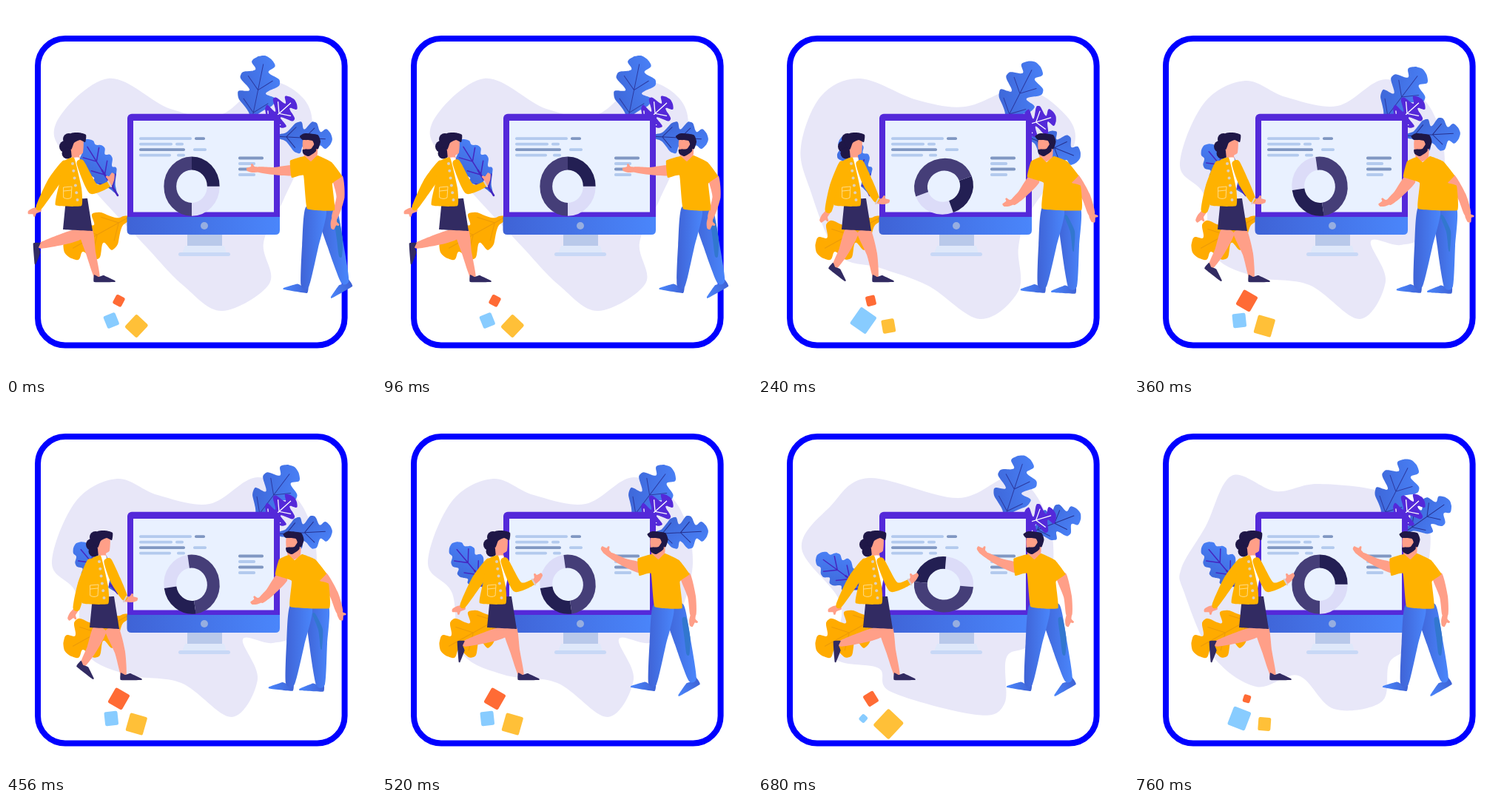
Write an HTML page that moves like this. It is 500 by 500 pixels and loops after 800 ms.

```html
<!DOCTYPE html>
<html lang="en">
<head>
<meta charset="utf-8">
<title>Dashboard team</title>
<style>
html, body { margin: 0; width: 100%; height: 100%; overflow: hidden; background: #fff; }
svg { display: block; width: 100vw; height: 100vh; }
</style>
</head>
<body>
<svg id="stage" viewBox="0 0 500 500">
  <defs>
    <linearGradient id="blue"><stop stop-color="#3f63d6"/><stop offset="1" stop-color="#4a86fb"/></linearGradient>
    <linearGradient id="leafBlue" x1="0" y1="1" x2="1" y2="0"><stop stop-color="#3b60d0"/><stop offset="1" stop-color="#4b85fc"/></linearGradient>
  </defs>
</svg>
<script>
const LOOP = 800;
const SCENE_STARTS = [0, 160, 360, 560, 760];
const POSE_STARTS = [0, 240, 520];
const SKIN = '#ff9f88', YELLOW = '#ffb200', HAIR = '#1f1747', SKIRT = '#322b62';
const BLUE = 'url(#blue)', LEAF_BLUE = 'url(#leafBlue)', PURPLE = '#5429d9', TEAL = '#3277cf';
const stage = document.getElementById('stage');

function set(node, attrs) {
  for (const key in attrs) node.setAttribute(key, attrs[key]);
  return node;
}
const el = (parent, tag, attrs = {}) =>
  parent.appendChild(set(document.createElementNS('http://www.w3.org/2000/svg', tag), attrs));
const group = (parent, x = 0, y = 0) => el(parent, 'g', { transform: `translate(${x} ${y})` });
const points = text => text.split(' ').map(p => p.split(',').map(Number));
const rect = (parent, x, y, width, height, fill, rx = 0) =>
  el(parent, 'rect', { x, y, width, height, fill, rx });
const line = (parent, d, stroke, width) =>
  el(parent, 'path', { d, stroke, fill: 'none', 'stroke-width': width, 'stroke-linecap': 'round' });

// Closed spline through the points; k sets the roundness.
function smooth(pts, k = 1) {
  const n = pts.length, at = i => pts[(i + n) % n], s = k / 6;
  let d = 'M' + pts[0];
  for (let i = 0; i < n; i++) {
    const [a, b, c, e] = [at(i - 1), at(i), at(i + 1), at(i + 2)];
    d += `C${b[0] + (c[0] - a[0]) * s} ${b[1] + (c[1] - a[1]) * s} `
       + `${c[0] - (e[0] - b[0]) * s} ${c[1] - (e[1] - b[1]) * s} ${c}`;
  }
  return d + 'Z';
}
const shape = (parent, text, fill, k = 0.6) => el(parent, 'path', { d: smooth(points(text), k), fill });

// Tapered limb through joints given as x,y,radius
function limb(parent, text, fill) {
  const joints = points(text), left = [], right = [];
  joints.forEach(([x, y, r], i) => {
    const a = joints[Math.max(i - 1, 0)], b = joints[Math.min(i + 1, joints.length - 1)];
    const angle = Math.atan2(b[1] - a[1], b[0] - a[0]);
    const dx = -Math.sin(angle) * r, dy = Math.cos(angle) * r;
    left.push([x + dx, y + dy]);
    right.unshift([x - dx, y - dy]);
  });
  return el(parent, 'path', { d: smooth([...left, ...right], 0.7), fill });
}
function hand(parent, x, y, turn, flip = 1) {
  shape(parent, '-2,-3 5,-4 8,-8 10,-7 10,-4 16,-2 15,2 8,4 -2,3', SKIN)
    .setAttribute('transform', `translate(${x} ${y}) rotate(${turn}) scale(1 ${flip})`);
}
function shoe(parent, x, y, turn, fill = SKIRT, sx = 1, sy = 1) {
  shape(parent, '-4,-1 2,2 9,0 24,7 24,9 -4,9', fill, 0.3)
    .setAttribute('transform', `translate(${x} ${y}) rotate(${turn}) scale(${sx} ${sy})`);
}

el(stage, 'rect', { x: 43, y: 44, width: 414.6, height: 414.5, rx: 37, fill: '#fff', stroke: '#00f', 'stroke-width': 8 });

// Background blob, one outline per scene
const blobs = [
  '138,98 222,139 290,147 350,102 402,125 412,175 375,262 348,320 356,375 292,412 240,378 190,326 92,217 67,160',
  '138,98 215,127 280,136 350,112 402,134 428,185 368,278 352,326 352,385 300,423 230,378 165,354 108,335 70,247 58,190 85,122',
  '150,101 205,123 275,135 340,99 398,134 420,215 393,305 360,323 320,318 340,372 305,423 237,377 165,366 107,335 95,256 62,215 94,132',
  '150,100 270,127 345,98 390,150 398,225 370,320 336,342 333,405 295,420 180,389 163,357 103,342 112,270 59,195 98,138',
  '132,97 192,118 250,108 345,122 400,172 375,315 345,350 335,402 270,412 222,367 165,382 106,340 68,255 64,222 97,165'
].map(text => smooth(points(text)));
const blob = el(stage, 'path', { fill: '#e8e7f8' });

// Lobed leaf growing upward from its base; a cosine cuts the notches.
function leaf(x, y, len, w, lobes, notch, fill, vein, veinWidth = 1) {
  const turn = el(group(stage, x, y), 'g'), right = [], left = [], N = 40;
  for (let i = 1; i < N; i++) {
    const t = i / N, cut = notch * (0.5 - 0.5 * Math.cos(2 * Math.PI * lobes * t)) ** 2;
    const half = Math.sqrt(Math.sin(Math.PI * t)) * Math.min(1, 4 * t) * (1 - cut);
    const rise = -len * (t + 0.16 * half * (1 - t));
    right.push([half * w, rise]);
    left.unshift([-half * w, rise]);
  }
  el(turn, 'path', { d: smooth([[0, 0], ...right, [0, -len], ...left]), fill });
  let veins = `M0 0V${-0.88 * len}`;
  for (let i = 1; i < lobes - 0.5; i++) {
    const root = -len * (i / lobes - 0.1), tip = root - 0.16 * len;
    veins += `M${-0.6 * w} ${tip}L0 ${root}L${0.6 * w} ${tip}`;
  }
  line(turn, veins, vein, veinWidth);
  return turn;
}
const leaves = [
  [leaf(330, 165, 100, 28, 3.2, 0.6, LEAF_BLUE, '#2c3aa0'), [11.6, 27, 37, 18, 27]],
  [leaf(362, 176, 79, 23, 3.2, 0.5, LEAF_BLUE, '#26318f'), [93, 112, 87, 69, 55]],
  [leaf(346, 166, 59, 21, 3.2, 0.75, PURPLE, '#fff', 1.3), [48, 73, 48, 73, 48]],
  [leaf(151, 256, 88, 21, 4.2, 0.28, LEAF_BLUE, '#4527c0', 1.5), [-32, -24, -40, -54, -40]]
];
line(leaves[3][0], 'M0 0V-40', '#4527c0', 2.6);
leaf(172, 282, 106, 30, 3.2, 0.55, '#ffab00', '#ec9a08').setAttribute('transform', 'rotate(-119)');

// Monitor
rect(stage, 245, 308, 47, 18, '#b9c9ea');
shape(stage, '242,324 295,324 298,334 238,334', '#dfe8fa', 0);
rect(stage, 233, 333, 70, 5, '#c8d8f6', 2.5);
rect(stage, 164, 145.7, 206, 150, PURPLE, 6);
rect(stage, 172, 155, 190, 123.5, '#e9f1ff');
el(stage, 'path', { d: 'M163.500 285H370V303Q370 309 364 309H169.500Q163.500 309 163.500 303Z', fill: BLUE });
el(stage, 'circle', { cx: 268, cy: 297, r: 5, fill: '#97aee0' });

// Placeholder text: two bars per row on the left, one on the right
const LIGHT = '#b3caee', DARK = '#8097c2';
const bar = (x, row, top, width, dark) =>
  rect(stage, x, top + 7.5 * row, width, 3.8, dark ? DARK : LIGHT, 1.7);
[[71, 255, 14], [45, 229, 11], [62, 253, 18], [43, 231, 11]].forEach(([first, x, second], row) => {
  bar(180, row, 177.2, first, row === 2);
  bar(x, row, 177.2, second, row === 0);
  bar(314, row, 203.6, row % 2 ? 23 : 34, row % 2 === 0);
});

// Ring chart, slightly oval, turned as a whole
const ring = el(stage, 'g');
[['#dcdcf8', 0, 90], ['#231f53', -90, 90], ['#453e78', 90, 180]].forEach(([stroke, from, sweep]) =>
  el(ring, 'circle', {
    r: 30.3, fill: 'none', stroke, 'stroke-width': 17.4, pathLength: 360,
    'stroke-dasharray': `${sweep} ${360 - sweep}`, transform: `scale(.965 1.03) rotate(${from})`
  }));
const ringTurns = [0, 70, 172, 275, 360];

// Tiles: size and angle per scene
const tiles = [
  ['#ff6b35', 152.5, 398.3, [13, 13, 22, 16, 10], [28, -13, 30, -32, 17]],
  ['#88ccff', 142.3, 425, [17, 26, 18, 9.5, 25], [-22, 35, -6, 42, 21]],
  ['#ffc038', 176.3, 432.5, [22.5, 17.5, 24, 29, 17], [43, -10, 16, 43, 4]]
].map(([fill, x, y, sizes, angles]) => ({ node: el(group(stage, x, y), 'rect', { fill, rx: 2.5 }), sizes, angles }));

// Woman
function womanBody(g) {
  shape(g, '81,261 110,260 117,304 77,302', SKIRT, 0);
  for (const [cx, cy, r] of points('85,180,8 80,190,8 83,199,7.500'))
    el(g, 'circle', { cx, cy, r, fill: HAIR });
  shape(g, '87,182 104,180 104,198 99,202 100,208 90,208 88,196', SKIN);
  shape(g, '80,184 88,172 98,171 108,174 107,184 100,181 92,185 88,194', HAIR);
  shape(g, '90,206 99,205 105,232 102,249 92,247', '#fff', 0.2);
  shape(g, '92,205 77,211 72,240 67,269 102,270 102,246', YELLOW, 0.4);
  for (let i = 0; i < 6; i++)
    el(g, 'circle', { cx: 90 + 1.3 * i, cy: 213 + 9.8 * i, r: 2, fill: '#dccfc0' });
  line(g, 'M78 245L89 244L88 259Q83 262 78 259ZM78 250L88 249', '#ffe09a', 0.9);
}
function womanStride(dx, handTurn) {
  const g = group(stage, dx);
  limb(g, '104,307,6 84,313,8 46,324,3.800', SKIN);
  shoe(g, 46, 324, 86);
  limb(g, '108,304,9 115,335,6.500 123,366,3.800', SKIN);
  shoe(g, 123, 364, 0);
  hand(g, 45, 275, 165);
  limb(g, '83,213,7 63,240,8 44,273,4', YELLOW);
  womanBody(g);
  hand(g, 140, 241, handTurn);
  limb(g, '100,211,5 118,247,8 139,241,4', YELLOW);
  line(g, 'M138 237L142 244', '#d9cfd0', 2.4);
  return g;
}
function womanWalk() {
  const g = group(stage);
  limb(g, '127,304,9 116,331,7 104,352,3.800', SKIN);
  shoe(g, 104, 350, 38);
  limb(g, '143,304,9 154,335,7 159,366,3.800', SKIN);
  shoe(g, 159, 364, 0);
  hand(g, 94, 279, 128);
  limb(g, '117,213,7 103,245,6.500 95,277,4.500', YELLOW);
  womanBody(group(g, 36));
  hand(g, 162, 264, 0);
  limb(g, '137,211,5 148,238,7 161,263,4', YELLOW);
  line(g, 'M163 260L159 267', '#d9cfd0', 2.2);
  return g;
}

// Man
function manHead(g) {
  shape(g, '402,180 418,179 421,190 420,205 410,211 404,207 401,192', SKIN);
  shape(g, '401,194 412,193 418,185 419,196 409,203 402,200', HAIR);
  shape(g, '397,176 404,172 421,174 425,183 422,193 418,192 414,182 401,181', HAIR);
}
function manStride(dx, frontArm, handTurn, backArm) {
  const g = group(stage, dx);
  shoe(g, 404, 377, 9, BLUE, -1.15, 1.15);
  shoe(g, 459, 372, -30, BLUE, -1.15, 1.15);
  limb(g, '433,274,13 445,322,11 458,372,5.500', BLUE);
  limb(g, '419,274,14 411,325,11 404,378,5.500', BLUE);
  limb(g, '447,290,3 451,315,4 452,338,2', TEAL);
  const [x, y] = points(backArm).pop();
  hand(g, x, y, 100);
  limb(g, backArm, SKIN);
  const [hx, hy] = points(frontArm).pop();
  hand(g, hx, hy, handTurn, -1);
  limb(g, frontArm, SKIN);
  manHead(g);
  shape(g, '403,203 412,210 421,202 440,211 454,230 441,240 444,276 407,274 402,229 386,232 384,209', YELLOW, 0.3);
  return g;
}
function manStand() {
  const g = group(stage);
  shoe(g, 384, 377, 6, BLUE, -1.15, 1.15);
  shoe(g, 425, 378, 3, BLUE, -1.15, 1.15);
  limb(g, '421,274,15 422,325,12 425,379,6', BLUE);
  limb(g, '399,274,15 391,325,12 384,378,6', BLUE);
  limb(g, '416,284,2 425,305,3 426,330,1', TEAL);
  hand(g, 346, 264, 160, -1);
  limb(g, '374,233,8 357,254,6 344,266,4', SKIN);
  hand(g, 450, 277, 78);
  limb(g, '427,232,7 443,257,6 451,281,4.500', SKIN);
  manHead(group(g, -22.5));
  shape(g, '382,204 390,211 400,203 418,210 433,229 424,239 436,243 437,276 384,274 386,239 364,231 369,210', YELLOW, 0.3);
  return g;
}
const poses = [
  [womanStride(0, -72), manStride(0, '390,222,7 362,223,5 341,221,3.500', 180, '448,231,7 452,258,5.500 444,286,4')],
  [womanWalk(), manStand()],
  [womanStride(65, -45), manStride(-38.5, '390,222,7 366,214,5.500 347,204,3.500', -140, '448,231,7 457,260,5.500 459,285,4')]
];

const stepAt = (starts, t) => starts.filter(s => s <= t).length - 1;

function draw(t) {
  const scene = stepAt(SCENE_STARTS, t), pose = stepAt(POSE_STARTS, t);
  blob.setAttribute('d', blobs[scene]);
  ring.setAttribute('transform', `translate(251 243.7) rotate(${ringTurns[scene]})`);
  for (const [node, angles] of leaves) node.setAttribute('transform', `rotate(${angles[scene]})`);
  for (const { node, sizes, angles } of tiles) {
    const w = sizes[scene], h = w * 1.06;
    set(node, { x: -w / 2, y: -h / 2, width: w, height: h, transform: `rotate(${angles[scene]})` });
  }
  poses.forEach((pair, i) => pair.forEach(g => { g.style.display = i === pose ? '' : 'none'; }));
}

const start = performance.now();
function tick() {
  draw((performance.now() - start) % LOOP);
  requestAnimationFrame(tick);
}
tick();
</script>
</body>
</html>
```
